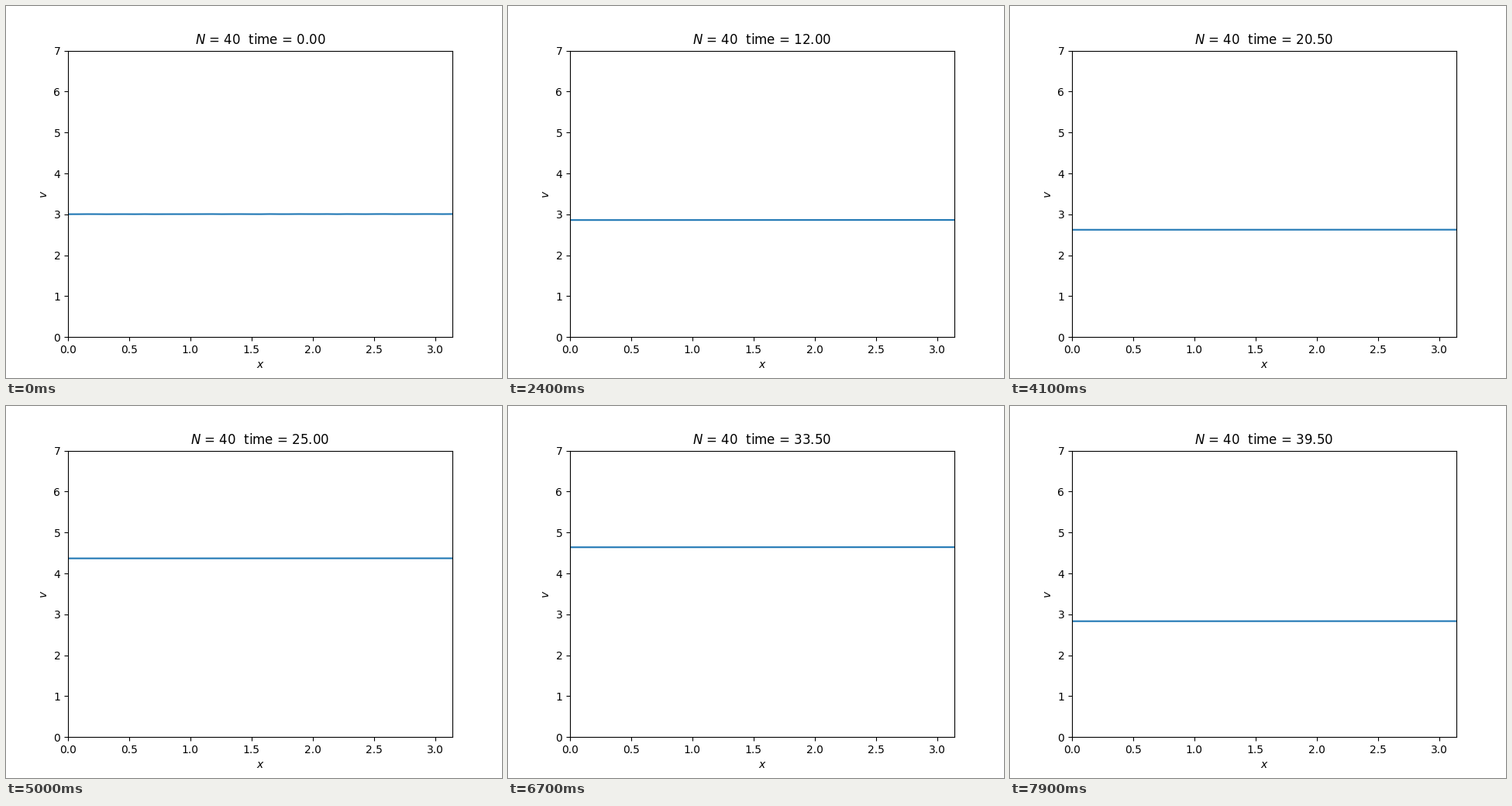
Recreate the animation shown at these times as a matplotlib script. Size 640x480 px, loop 8000 ms.

```python
import numpy as np
import matplotlib.pyplot as plt
from matplotlib.animation import FuncAnimation

N = 40
FRAMES, INTERVAL = 80, 100
DT = 0.5

GROWTH = 0.2          # linear growth rate
OMEGA = 0.75          # frequency of small oscillations
SLOWDOWN = 0.088      # frequency lost on the limit cycle
T_PEAK = 6.6
AMP_START, AMP_LIMIT = 0.0224, 1.43
SKEW = 0.53           # slow rise, quick fall

x = np.linspace(0, np.pi, N + 1)
noise = np.random.default_rng(3).uniform(-1, 1, N + 1)


def level(t):
    """Oscillation about v = 3 that grows into a skewed limit cycle."""
    q = (AMP_START / AMP_LIMIT * np.exp(GROWTH * t)) ** 2
    r = np.sqrt(q / (1 + q))
    phase = OMEGA * (t - T_PEAK) - SLOWDOWN * np.log1p(q) / (2 * GROWTH)
    c = np.cos(phase - SKEW * r * np.cos(phase))
    return 3 + AMP_LIMIT * r * c + r**3 * (0.2 + 0.095 * c * c)


def profile(t):
    return level(t) - 0.001 * np.cos(x) + 0.0015 * noise * np.exp(-3 * t)


fig, ax = plt.subplots(figsize=(6.4, 4.8), dpi=100)
line, = ax.plot(x, profile(0))
ax.set_xlim(0, np.pi)
ax.set_ylim(0, 7)
ax.set_xlabel("$x$")
ax.set_ylabel("$v$")
title = ax.set_title("")


def update(k):
    t = k * DT
    line.set_ydata(profile(t))
    title.set_text(f"$N$ = {N}  time = {t:.2f}")
    return line, title


anim = FuncAnimation(fig, update, frames=FRAMES, interval=INTERVAL,
                     repeat=True, repeat_delay=0, blit=False)
plt.show()
```
